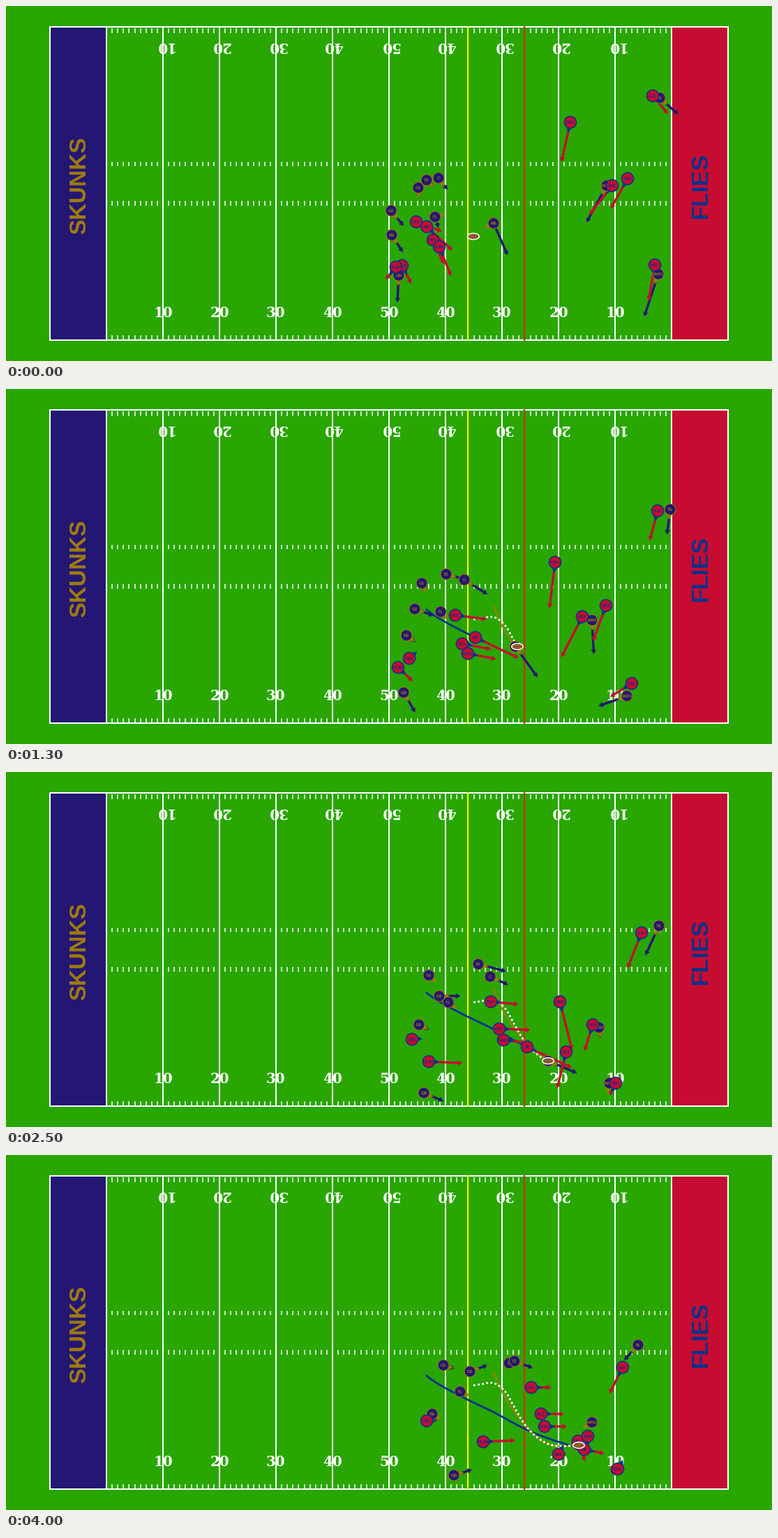
Write a matplotlib script that moves like this. It is 1098x510 px and loops after 4100 ms.

```python
import matplotlib.pyplot as plt
import numpy as np
from matplotlib.animation import FuncAnimation
from matplotlib.patches import Circle, Ellipse, Polygon, Rectangle

# A power-of-two dpi keeps figsize * dpi exact.
W, H, DPI = 1098, 510, 64
FRAMES, INTERVAL = 41, 100
PT = 72 / DPI

GRASS, WHITE = "#29a600", "#ffffff"
PURPLE, GOLD = "#241773", "#9e7c0c"
RED, BLUE = "#c60c30", "#00338d"
YARD, LEFT, TOP, BOTTOM = 8.1, 63, 30, 480

fig = plt.figure(figsize=(W / DPI, H / DPI), dpi=DPI, facecolor=GRASS)
ax = fig.add_axes([0, 0, 1, 1])
ax.set_xlim(0, W)
ax.set_ylim(H, 0)
ax.axis("off")


def yard_x(yard):
    return LEFT + YARD * yard


def line(xs, ys, color, width, z, **style):
    return ax.plot(xs, ys, color=color, lw=width * PT, zorder=z, **style)[0]


def label(x, y, text, color, size, z, family="Liberation Sans", angle=0):
    return ax.text(x, y, text, color=color, fontsize=size * PT, family=family,
                   weight="bold", ha="center", va="baseline", zorder=z,
                   rotation=angle, rotation_mode="anchor")


def draw_field():
    for start, fill, ink, name, base in ((0, PURPLE, GOLD, "SKUNKS", 114.5),
                                         (110, RED, BLUE, "FLIES", 1005)):
        ax.add_patch(Rectangle((yard_x(start), TOP), 10 * YARD, BOTTOM - TOP,
                               fc=fill, ec="none", zorder=1))
        label(base, 257.5, name, ink, 33.3, 3, angle=90)
    ax.add_patch(Rectangle((LEFT, TOP), 120 * YARD, BOTTOM - TOP, fill=False,
                           ec=WHITE, lw=2 * PT, zorder=2))
    for yard in range(10, 111):
        x = yard_x(yard)
        if yard % 10 == 0:
            line([x, x], [TOP, BOTTOM], WHITE, 2, 2)
            number = min(yard - 10, 110 - yard)
            if number:
                label(x, 447, str(number), WHITE, 20, 3, "DejaVu Serif")
                label(x + 1.5, 52, str(number), WHITE, 20, 3, "DejaVu Serif", 180)
        else:
            for y in (32, 223.5, 280, 473):
                line([x, x], [y, y + 6.5], WHITE, 1.5, 2, solid_capstyle="butt")
    for yard, color in ((74, "#fcf800"), (84, "#d0300c")):
        line([yard_x(yard)] * 2, [TOP - 1, BOTTOM + 1], color, 2.2, 4,
             solid_capstyle="butt")


class Path:
    """Clamped cubic spline through timed points; gives place and velocity."""

    def __init__(self, times, points, v_start, v_end):
        self.t = t = np.array(times, float)
        self.p = p = np.array(points, float)
        h = np.diff(t)
        slope = np.diff(p, axis=0) / h[:, None]
        a, b = np.eye(len(t)), np.zeros_like(p)
        b[0], b[-1] = v_start, v_end
        for i in range(1, len(t) - 1):
            a[i, i - 1:i + 2] = h[i], 2 * (h[i - 1] + h[i]), h[i - 1]
            b[i] = 3 * (h[i] * slope[i - 1] + h[i - 1] * slope[i])
        self.m = np.linalg.solve(a, b)

    def at(self, time):
        i = min(max(np.searchsorted(self.t, time, "right") - 1, 0), len(self.t) - 2)
        h = self.t[i + 1] - self.t[i]
        s = (time - self.t[i]) / h
        p0, p1, m0, m1 = self.p[i], self.p[i + 1], self.m[i] * h, self.m[i + 1] * h
        c2, c3 = 3 * (p1 - p0) - 2 * m0 - m1, 2 * (p0 - p1) + m0 + m1
        place = p0 + s * (m0 + s * (c2 + s * c3))
        return place, (m0 + s * (2 * c2 + 3 * s * c3)) / h

    def trail(self, time):
        return np.array([self.at(s)[0] for s in np.linspace(0, time, 80)]).T


def arrow_shape(origin, vector, width, head_width, head_length):
    length = max(np.hypot(*vector), 1e-6)
    along = np.asarray(vector) / length
    side = np.array([-along[1], along[0]])
    neck = max(length - head_length, 0)
    outline = ((0, width), (neck, width), (neck, head_width), (length, 0),
               (neck, -head_width), (neck, -width), (0, -width))
    return [origin + along * u + side * v / 2 for u, v in outline]


class Player:
    def __init__(self, name, home, path, z, turn):
        self.path, self.turn = path, turn
        fill, ink = (PURPLE, GOLD) if home else (RED, BLUE)
        self.speed = Polygon([(0, 0)] * 3, fc=fill, ec="none", zorder=6)
        self.facing = Polygon([(0, 0)] * 3, fc=ink, ec="none", zorder=7)
        self.dot = Circle((0, 0), 8 if home else 8.6, fc=fill, ec=ink,
                          lw=(1 if home else 1.5) * PT, zorder=z)
        for patch in (self.speed, self.facing, self.dot):
            ax.add_patch(patch)
        self.text = label(0, 0, name, ink, 6.2, z)

    def update(self, time):
        place, velocity = self.path.at(time)
        angle = np.arctan2(velocity[1], velocity[0])
        angle += np.radians(self.turn) * max(0, 1 - time / 1.3)
        look = 15 * np.array([np.cos(angle), np.sin(angle)])
        self.speed.set_xy(arrow_shape(place, velocity, 3.4, 7.5, 6.5))
        self.facing.set_xy(arrow_shape(place, look, 2, 7, 6.5))
        self.dot.center = place
        self.text.set_position((place[0], place[1] + 2.2))


KNOTS = (0, 0.6, 1.3, 1.7, 2.5, 3.3, 4.0)
players = {}


def add(name, v_start, v_end, *points, home=True, turn=0):
    z = (10 if home else 12) + len(players) * 0.05
    path = Path(KNOTS, points, v_start, v_end)
    players[name] = Player(name, home, path, z, turn)


draw_field()

add("G1", (2, 15), (16, 5), (591, 261), (593, 270), (596, 279), (599, 284),
    (606, 292), (615, 298), (627, 302))
add("C", (13, 17), (10, -3), (620, 247), (634, 259), (657, 274), (670, 282),
    (694, 294), (711, 300), (721, 299))
add("T2", (11, 10), (26, 10), (603, 250), (613, 258), (631, 266), (645, 269),
    (677, 276), (707, 286), (729, 296))
add("G2", (18, 22), (25, -9), (552, 294), (567, 306), (586, 316), (597, 319),
    (621, 322), (645, 318), (665, 311))
add("T1", (5, 16), (11, 5), (615, 303), (618, 312), (623, 320), (626, 323),
    (634, 331), (643, 336), (651, 340), turn=-90)
add("FB", (16, 25), (10, 6), (553, 329), (563, 343), (574, 354), (579, 357),
    (592, 363), (602, 368), (611, 372))
add("QB", (-2, 39), (26, -8), (563, 387), (563, 411), (570, 436), (578, 446),
    (599, 461), (622, 464), (642, 460))
add("RB", (20, 46), (12, -3), (699, 312), (711, 340), (730, 370), (744, 388),
    (777, 415), (806, 418), (820, 417), turn=85)
add("TE", (27, 24), (-20, 22), (937, 132), (950, 149), (952, 173), (949, 188),
    (936, 221), (920, 253), (906, 273))
add("WR1", (-20, 61), (6, -2), (935, 385), (917, 419), (890, 441), (875, 444),
    (865, 447), (868, 453), (874, 452))
add("WR2", (-29, 53), (-8, 5), (861, 258), (846, 293), (840, 332), (843, 349),
    (850, 367), (846, 378), (840, 384))

add("ILB", (22, 26), (-19, 38), (927, 129), (936, 148), (934, 175), (928, 193),
    (911, 231), (897, 273), (884, 305), home=False)
add("CB1", (-13, 57), (10, 29), (809, 167), (798, 204), (787, 249), (786, 276),
    (794, 330), (810, 382), (820, 411), home=False)
add("CB2", (13, 26), (16, -2), (568, 373), (574, 384), (578, 387), (579, 385),
    (582, 384), (592, 383), (603, 382), home=False)
add("CB3", (-24, 43), (-1, 14), (891, 248), (875, 276), (860, 311), (853, 331),
    (841, 363), (835, 391), (834, 404), home=False)
add("SS1", (-9, 52), (3, -5), (930, 372), (919, 402), (897, 423), (886, 430),
    (874, 447), (872, 454), (877, 451), home=False)
add("SS2", (-33, 42), (3, -6), (869, 258), (848, 287), (826, 327), (815, 351),
    (803, 402), (793, 428), (792, 430), home=False)
add("DT1", (16, 35), (33, 0), (612, 336), (627, 355), (654, 366), (671, 368),
    (707, 369), (741, 371), (767, 372), home=False)
add("DT2", (37, 14), (29, 0), (588, 310), (613, 319), (644, 325), (662, 327),
    (695, 330), (727, 333), (753, 334), home=False)
add("DE", (37, 34), (29, 6), (603, 317), (632, 336), (673, 357), (698, 369),
    (747, 395), (798, 414), (829, 423), home=False)
add("OLB1", (17, 42), (32, 0), (621, 346), (637, 368), (662, 380), (679, 382),
    (713, 385), (746, 389), (772, 390), home=False)
add("OLB2", (-15, 18), (46, -2), (559, 375), (555, 387), (562, 400), (573, 408),
    (606, 416), (648, 414), (684, 412), home=False)

ball_path = Path((0, 0.2, 0.4, 0.6, 0.9, 1.3, 1.7, 2.5, 3.3, 4.0),
                 [(670, 331), (685, 328.5), (700, 328), (713, 337), (722, 350),
                  (733, 370), (745, 389), (777, 415), (807, 418), (821, 417)],
                 (75, -12), (12, -3))
ball = Ellipse((0, 0), 16.5, 9, fc="#8b5a2b", ec=WHITE, lw=1.5 * PT, zorder=20)
ax.add_patch(ball)

trails = [
    (players["DE"].path, line([], [], BLUE, 2.8, 5)),
    (players["RB"].path, line([], [], GOLD, 2.2, 5)),
    (ball_path, line([], [], WHITE, 2.8, 5.5, linestyle=(0, (1, 1.2)),
                     dash_capstyle="butt")),
]


def update(frame):
    time = frame * INTERVAL / 1000
    for player in players.values():
        player.update(time)
    for path, curve in trails:
        curve.set_data(*path.trail(time))
    ball.center = ball_path.at(time)[0]
    return []


animation = FuncAnimation(fig, update, frames=FRAMES, interval=INTERVAL,
                          init_func=lambda: update(0), repeat=True,
                          repeat_delay=0, blit=False)
plt.show()
```
